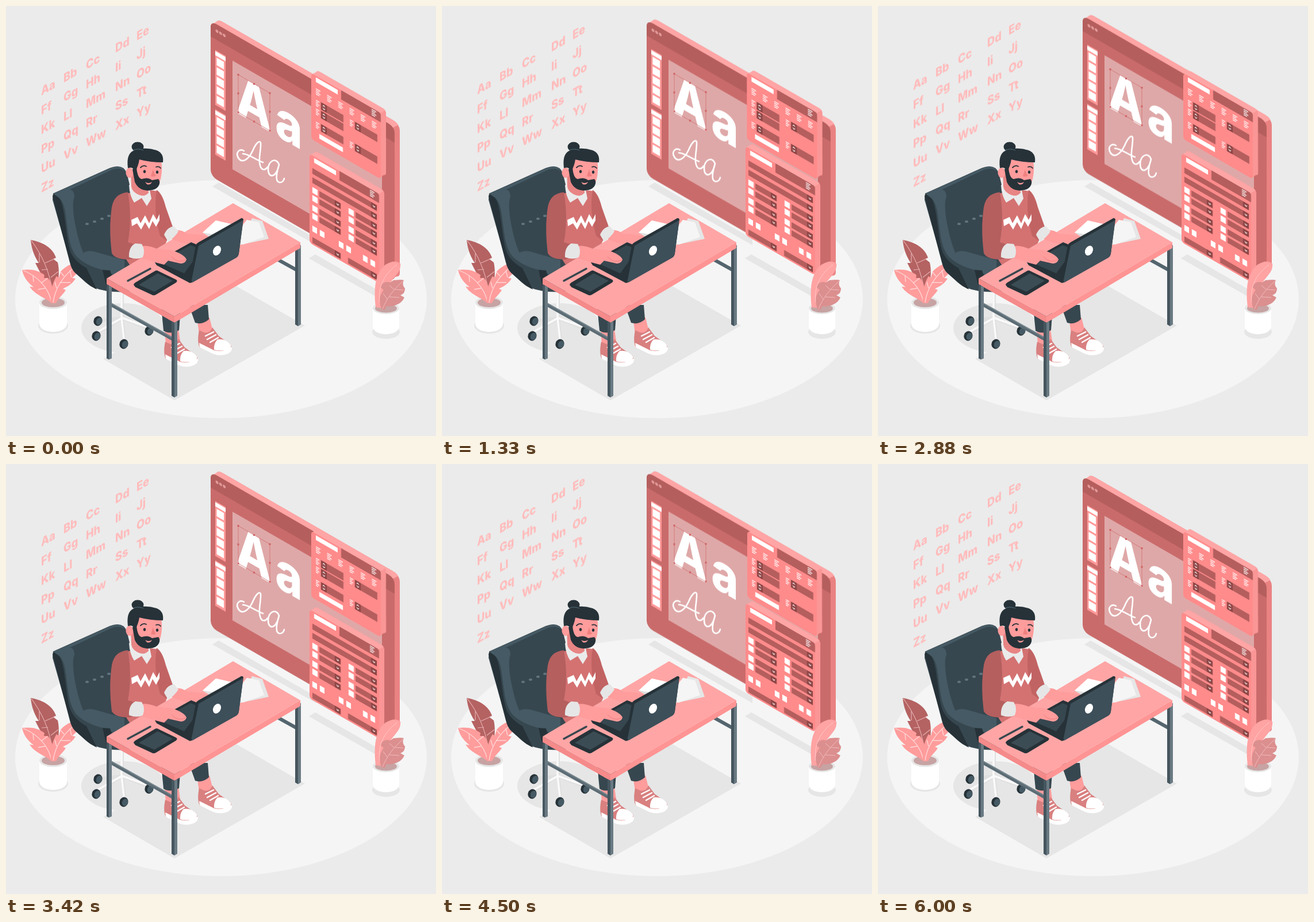
These frames come from a looping animation (748 by 748 pixels, 6040 ms). An HTML page:

```html
<!DOCTYPE html>
<html lang="en">
<head>
<meta charset="utf-8">
<title>Type designer at work</title>
<style>
html, body { margin: 0; width: 100%; height: 100%; overflow: hidden; background: #ebebeb; }
svg { display: block; width: 100%; height: 100%; }
text { font-family: Inter, "Open Sans", sans-serif; font-weight: 800; }
.float { animation: float 6040ms linear infinite; }
.slide { animation: slide 6040ms linear infinite; }
.beat { animation: beat 6040ms linear infinite; transform-origin: 596px 204.5px; }
@keyframes float {
  0%, 16.556% { transform: translateY(0); }
  66.225% { transform: translateY(-15px); }
  100% { transform: translateY(-4.8px); }
}
@keyframes slide {
  0%, 49.669%, 99.338% { transform: translateY(0); }
  24.834%, 74.503% { transform: translateY(-15px); }
  100% { transform: translateY(-.4px); }
}
@keyframes beat {
  0%, 8.278%, 23.179%, 28.146%, 38.079%, 57.947%, 72.848%, 77.815%, 87.748%, 100% { transform: scale(1); }
  13.245%, 33.113%, 62.914%, 82.781% { transform: scale(1.09); }
}
</style>
</head>
<body>
<svg viewBox="0 0 748 748">
  <rect width="748" height="748" fill="#ebebeb"/>
  <ellipse cx="374" cy="510" rx="358" ry="207" fill="#f5f5f5"/>

  <!-- floor shadows -->
  <g fill="#e6e6e6">
    <path d="M359 314L370 307L540 405V416Z"/>
    <path d="M527 439L538 432L655 499V512Z"/>
    <path d="M169 614L395 484L520 556L293 686Z"/>
    <ellipse cx="204" cy="560" rx="73" ry="43"/>
    <ellipse cx="82" cy="556" rx="26" ry="14"/>
    <ellipse cx="661" cy="567" rx="24" ry="12"/>
  </g>

  <g class="float" id="letters" fill="#ffbcbc"></g>

  <g class="float">
    <g id="screen" transform="matrix(1 .577 0 1 356 26)"></g>
    <g fill="#fff" font-size="93" text-anchor="middle">
      <text transform="matrix(.866 .5 0 1 431 202.6)">A</text>
      <text transform="matrix(.866 .5 0 1 492 238)">a</text>
    </g>
    <path d="M404 119.500L459 151.500V217L404 185Z" fill="none" stroke="#d06e6e" stroke-width=".8"/>
    <g id="handles"></g>
    <g fill="none" stroke="#fff" stroke-width="2.600" stroke-linecap="round" stroke-linejoin="round">
      <path d="M414 252C406 247 399 255 404 264C411 276 423 265 429 252C434 240 441 232 443 238C444 252 437 270 444 282C447 286 452 285 455 280"/>
      <path d="M412 257C421 257 436 268 447 272"/>
      <path d="M475 276C471 263 456 268 456 284C456 300 470 300 475 276C470 292 468 306 476 307C480 307 483 304 484 300"/>
    </g>
  </g>

  <g class="slide"><g id="low" transform="matrix(1 .577 0 1 528 257)"></g></g>
  <g class="beat"><g id="high" transform="matrix(1 .577 0 1 531 116.500)"></g></g>

  <!-- right plant -->
  <path d="M638 526V558Q640 570 661 571Q682 570 684 558V526Z" fill="#fff"/>
  <ellipse cx="661" cy="526" rx="23" ry="10" fill="#e6e6e6"/>
  <ellipse cx="661" cy="526" rx="19" ry="7.500" fill="#c7a3a3"/>
  <path d="M643 524C640 498 640 466 660 450Q676 440 686 448C688 462 676 470 668 482Q658 500 658 526Z" fill="#ffa3a3"/>
  <path d="M650 516C647 490 656 468 680 450" fill="none" stroke="#ffc9c9"/>
  <path d="M653 527C648 512 650 503 657 494L652 490C653 481 661 478 668 481L674 477C684 476 690 476 692 477C689 484 691 488 694 491C694 499 690 502 686 503L693 507C688 520 670 524 662 522L658 529Z" fill="#dc8f8f"/>
  <path d="M655 527C662 510 672 495 691 478M664 511L656 500M667 506L684 507M676 494L667 486M677 493L691 494" fill="none" stroke="#f2bcbc"/>

  <!-- left plant -->
  <path d="M58 516V554Q61 566 82 567Q103 566 106 554V516Z" fill="#fff"/>
  <ellipse cx="82" cy="516" rx="24" ry="11" fill="#e6e6e6"/>
  <ellipse cx="82" cy="516" rx="20" ry="8" fill="#c7a3a3"/>
  <path d="M79 512C75 488 58 462 51 447L57 447C47 432 44 418 43 407C66 411 82 422 87 438L82 440L90 446C94 464 91 482 85 514Z" fill="#b56262"/>
  <path d="M44 408C62 432 80 465 82 514M58 430V446M68 447L84 440M73 458L62 459M78 472L91 462" fill="none" stroke="#e6b0b0" stroke-width="1.200"/>
  <path d="M78 516C62 504 50 502 41 488L48 489C35 479 30 469 28 459C45 457 57 460 67 468L66 473L73 473C82 484 84 500 84 516Z" fill="#ff9c9c"/>
  <path d="M30 460C55 470 74 490 79 515M47 469L48 480M61 482L72 474M68 491L56 493" fill="none" stroke="#ffd8d8" stroke-width="1.300"/>
  <path d="M78 517C77 500 80 482 88 470L92 473L95 462C106 450 119 446 133 444C131 457 124 466 115 473L121 474C113 487 103 489 99 492L104 494C98 504 92 506 87 517Z" fill="#ff9c9c"/>
  <path d="M132 445C106 462 86 485 82 516M111 460L114 472M101 470L95 463M94 481L112 481M88 491L85 480" fill="none" stroke="#ffd8d8" stroke-width="1.300"/>

  <!-- chair -->
  <g stroke="#e0e0e0" stroke-width="6" stroke-linecap="round">
    <path d="M202 500V545M202 543L160 548M202 543L160 568M202 543L206 580M202 543L246 560"/>
    <path d="M201 500V543L161 566M201 543L205 578M203 543L245 558" stroke="#fafafa" stroke-width="3.500" fill="none"/>
  </g>
  <g id="casters"></g>
  <path d="M82 326L180 282Q203 273 210 290L222 340L245 440L215 497Q165 500 143 484L120 463Q114 455 111 443L81 337Z" fill="#37474f"/>
  <path d="M81 331Q83 324 92 332C103 350 103 390 110 420Q114 441 140 456L158 493Q148 489 139 481L120 464Q114 458 111 446Z" fill="#263238"/>
  <path d="M83 327Q87 322 107 319Q119 318 119 332C112 345 122 398 134 428Q138 434 158 441Q178 444 182 462L168 459Q140 452 124 437Q112 425 108 394C103 360 104 342 90 332Z" fill="#455a64"/>
  <path d="M86 325L180 283Q200 274 208 288Q198 280 184 285L112 319Z" fill="#455a64"/>
  <path d="M134 430Q142 423 160 429L206 442V466Q186 474 180 460Q176 447 156 443Q136 439 134 430Z" fill="#455a64"/>
  <path d="M181 460Q184 474 192 478L178 497Q172 480 168 459Z" fill="#263238"/>
  <g fill="#61747d">
    <ellipse cx="141" cy="379" rx="3" ry="2"/><ellipse cx="154" cy="375" rx="3" ry="2"/>
    <ellipse cx="167" cy="370" rx="3" ry="2"/><ellipse cx="179" cy="365" rx="3" ry="2"/>
  </g>

  <!-- legs and shoes -->
  <path d="M276 562H300L304 590H278Z" fill="#ff9c9c"/>
  <path d="M332 542H354L361 570H336Z" fill="#ff9c9c"/>
  <path d="M270 524H304L301 564Q285 572 274 565Z" fill="#37474f"/>
  <path d="M318 520H351L353 545Q342 555 329 551Z" fill="#37474f"/>
  <g id="shoe">
    <path d="M277 584C274 598 275 608 278 614L303 625Q318 630 330 623Q336 617 331 608L311 594L300 579Q296 590 286 588Z" fill="#d98080"/>
    <path d="M277 606L303 619Q318 623 334 613Q335 621 327 625Q314 630 301 625L278 614ZM309 600Q322 598 331 608Q334 613 330 616Q315 622 303 618Q302 607 309 600Z" fill="#fff"/>
    <path d="M288 594L302 587M291 600L306 592M296 605L310 597" stroke="#fff" stroke-width="2.500" stroke-linecap="round"/>
  </g>
  <use href="#shoe" x="59" y="-20"/>

  <!-- table frame, far side -->
  <path d="M470 436L506 456V463L470 443Z" fill="#54656e"/>
  <path d="M503 416H508V557L503 554Z" fill="#46565f"/><path d="M508 416H513V554L508 557Z" fill="#6a7a83"/>
  <path d="M181 515L290 576V583L181 522Z" fill="#5c6c75"/>
  <path d="M181 515L290 576V578L181 517Z" fill="#7a8990"/>

  <!-- torso -->
  <path d="M205 328Q236 318 264 322Q277 338 286 395L272 425L215 450L196 420Z" fill="#d47272"/>
  <path d="M262 320Q272 326 278 350L290 384L279 408L268 400Q256 356 262 320Z" fill="#c26363"/>
  <path d="M212 324Q188 326 184 350C179 385 182 410 184 430Q190 441 214 441L229 437L222 414L212 411Q220 370 212 324Z" fill="#b55f5f"/>
  <path d="M218 372L229 367L234 378L242 364L249 378L256 362L262 372L267 362V373L261 384L255 374L249 388L242 376L235 389L228 378L219 383Z" fill="#fff"/>
  <path d="M214 312L220 304L250 320L253 335L245 348L236 334L223 342Q215 330 214 312Z" fill="#ebebeb"/>
  <path d="M217 286L247 306L248 325Q240 334 228 327Q219 322 218 314Z" fill="#e88585"/>

  <!-- head -->
  <ellipse cx="215" cy="290" rx="6.500" ry="9" fill="#ff9c9c"/>
  <path d="M219 266Q246 258 270 268C273 286 270 308 262 314Q240 320 224 304Z" fill="#ff9c9c"/>
  <path d="M220 284L227 279Q228 299 236 301Q247 297 254 303L265 301Q268 304 267 309Q264 321 246 321Q230 320 224 306Z" fill="#263238"/>
  <path d="M242 306Q248 310 254 306Q251 312 245 310Z" fill="#ff9c9c"/>
  <path d="M212 282Q209 258 221 252Q240 244 262 251Q275 256 273 272Q250 272 232 267Q230 279 225 287Q220 281 217 281Z" fill="#263238"/>
  <ellipse cx="229" cy="245" rx="10.500" ry="8.500" fill="#263238"/>
  <path d="M221 251Q229 247 239 251" fill="none" stroke="#546e7a"/>
  <path d="M256 284Q257 291 261 295Q258 298 252 296" fill="#f08080"/>
  <g fill="#263238"><ellipse cx="241" cy="288" rx="2.200" ry="2.800"/><ellipse cx="263" cy="289" rx="2.200" ry="2.800"/></g>
  <path d="M234 281Q239 276 244 279M261 280Q266 278 269 282" fill="none" stroke="#263238" stroke-width="1.800" stroke-linecap="round"/>

  <!-- table top -->
  <path d="M175 474L395 343L512 411L293 540Z" fill="#ffa5a5"/>
  <path d="M175 474L293 540V551L175 484Z" fill="#f58a8a"/>
  <path d="M293 540L512 411V421L293 551Z" fill="#ff9494"/>
  <path d="M175 484L179 486V615L175 613Z" fill="#46565f"/><path d="M179 486L184 489V613L179 615Z" fill="#6a7a83"/>
  <path d="M288 548L293 551V681L288 678Z" fill="#46565f"/><path d="M293 551L298 548V678L293 681Z" fill="#6a7a83"/>

  <!-- papers, tablet, pen -->
  <path d="M405 416L428 369L446 374L457 405Z" fill="#e6e6e6"/>
  <path d="M392 406L419 372L440 376L449 402L412 415Z" fill="#f5f5f5"/>
  <path d="M342 394L365 373L400 381L382 400L360 405Z" fill="#fff"/>
  <path d="M342 394L360 397L382 400L365 408Z" fill="#e0e0e0"/>
  <path d="M222 485Q222 483 225 481L259 461Q262 459 265 461L296 476Q299 478 296 481L261 502Q258 504 255 503L225 489Z" fill="#263238"/>
  <path d="M231 485L264 465L290 478L258 497Z" fill="#3c4c55"/>
  <path d="M212 478L251 457" stroke="#37474f" stroke-width="3.500" stroke-linecap="round"/>

  <!-- hands and laptop -->
  <path d="M286 394Q302 385 314 396L340 398L356 403L325 416Q298 411 288 405Z" fill="#ff9c9c"/>
  <path d="M275 398Q280 385 292 383L300 392Q294 402 282 410Z" fill="#e6e6e6"/>
  <path d="M259 446L322 411L354 424L320 482L262 451Z" fill="#263238"/>
  <path d="M267 446L321 416L340 424L310 465Z" fill="#37474f"/>
  <path d="M226 421Q240 413 262 422L289 425Q310 432 314 441Q312 448 304 448L282 443L275 450Q240 441 229 436Z" fill="#ff9c9c"/>
  <path d="M288 436Q299 449 314 441" fill="none" stroke="#ed8080"/>
  <path d="M214 437Q213 419 225 413L236 414Q243 425 238 437Q228 442 214 437Z" fill="#e6e6e6"/>
  <path d="M330 417Q331 413 335 411L406 371Q411 367 413 371L405 430Q404 436 400 438L325 480Q320 483 318 480Z" fill="#263238"/>
  <path d="M335 417L410 374Q413 371 412 377L405 431Q404 436 400 438L326 480Q322 482 323 476Z" fill="#3d4f59"/>
  <ellipse cx="367" cy="425.500" rx="6.500" ry="9" transform="rotate(27 367 425.500)" fill="#fff"/>
</svg>
<script>
const put = (id, html) => document.getElementById(id).innerHTML = html;
const times = (n, fn) => Array.from({ length: n }, (_, i) => fn(i)).join("");
const rect = (x, y, w, h, fill) => `<rect x="${x}" y="${y}" width="${w}" height="${h}" fill="${fill}"/>`;
const DARK = "#b55e5e", PINK = "#ff8b8b", LIGHT = "#ffa5a5", CELL = "#8f4646";

// Slab with a visible top and right side, in wall coordinates.
const slab = (w, h, r, fill, side) => `
  <rect x="9" y="-10.400" width="${w}" height="${h}" rx="${r}" fill="${side}"/>
  <path d="M${r * .3} ${r * .3}L${9 + r * .3} ${-10.4 + r * .3}Q${9 + r * .6} -10.400 ${9 + r} -10.400H${w + 9 - r}
    Q${w + 9 - r * .4} -10.400 ${w + 9 - r * .25} ${r * .3 - 10.4}L${w - r * .3} ${r * .3}Z" fill="${LIGHT}"/>
  <path d="M${w - r * .3} ${r * .3}L${w + 9 - r * .25} ${r * .3 - 10.4}L${w + 9} ${h - 10.4 - r}L${w - r * .3} ${h - r * .3}Z" fill="${side}"/>
  <rect width="${w}" height="${h}" rx="${r}" fill="${fill}"/>`;
const lines = (x, y, w, n) => times(n, i => rect(x, y + i * 3, i % 2 ? w - 2 : w, 1.4, "#fff"));
const chevron = (x, y, dir) => `<path d="M${x - 2} ${y - dir}L${x} ${y + dir}L${x + 2} ${y - dir}" fill="none" stroke="#fff" stroke-width="1.100"/>`;

put("letters", times(26, i => {
  const x = [61, 100, 139, 190, 227][i % 5], row = Math.floor(i / 5);
  const y = 156 + row * 33.8 - (x - 61) * .577, cap = String.fromCharCode(65 + i);
  return `<text font-size="21" transform="matrix(.866 -.5 0 1 ${x} ${y})">${cap}${cap.toLowerCase()}</text>`;
}));

const toolbar = (y, n) => rect(8, y, 18, 13 + n * 16.5, "#ff9a9a") + rect(8, y + 2, 18, 7, "#fff") +
  times(n, i => rect(10.5, y + 12 + i * 16.5, 12.5, 13, "#fff"));
put("screen", slab(320, 270, 11, "#ca6b6b", "#ea8282") +
  `<path d="M0 27V11Q0 0 11 0H309Q320 0 320 11V27Z" fill="${DARK}"/>` +
  times(3, i => `<circle cx="${11 + i * 6.3}" cy="11.500" r="2.600" fill="#e39a9a"/>`) +
  rect(38, 47, 260, 189, "#dfa8a8") + toolbar(46, 5) + toolbar(149, 4));

put("handles", [[404, 119.5], [431.5, 135.5], [459, 151.5], [459, 184], [459, 217], [431.5, 201], [404, 185], [404, 152]]
  .map(([x, y]) => rect(x - 1.5, y - 1.5, 3, 3, "#d06060")).join(""));

// Header with a title on the left and a menu icon on the right.
const panel = (h, icon) => slab(121, h, 5, PINK, "#fa9696") + rect(8, 3, 38, 8, "#fff") +
  `<path d="M52 0H117Q121 0 121 4V16H52Z" fill="${DARK}"/>` + lines(105, icon, 8, 4);

const spinner = (x, y) => lines(x - 9, y + 1, 6, 4) + rect(x, y, 39, 13, DARK) + rect(x, y, 10, 13, CELL) +
  chevron(x + 5, y + 4, -1) + chevron(x + 5, y + 9, 1);
put("high", panel(115, 2) + times(6, i => lines(8 + i * 19.5, 22, 8, 4)) +
  [[17, 41], [17, 56], [17, 79], [76, 41], [76, 79]].map(([x, y]) => spinner(x, y)).join("") +
  rect(14, 98, 41, 8, "#fff"));

const select = (x, y, end) => rect(x, y - 5, end - x, 10, DARK) + rect(end - 10, y - 5, 10, 10, CELL) + chevron(end - 5, y, 1);
put("low", panel(155, 2) + select(5, 27, 117) + select(5, 43, 117) +
  [60, 74, 91, 105].map(y => rect(5, y - 5, 9, 10, "#fff") + select(17, y, 54) +
    rect(68, y - 5, 9, 10, "#fff") + select(80, y, 117)).join("") +
  [9, 22, 55, 68, 97, 110].map(x => rect(x - 4, 122, 8, 10, "#fff")).join("") +
  select(5, 147, 54) + select(67, 147, 117));

put("casters", [[160, 548], [157, 574], [205, 588], [249, 565]].map(([x, y]) =>
  `<g transform="rotate(20 ${x} ${y})"><ellipse cx="${x}" cy="${y}" rx="7.500" ry="8.500" fill="#263238"/>
   <ellipse cx="${x + 2}" cy="${y}" rx="5" ry="6.500" fill="#455a64"/></g>`).join(""));
</script>
</body>
</html>
```
